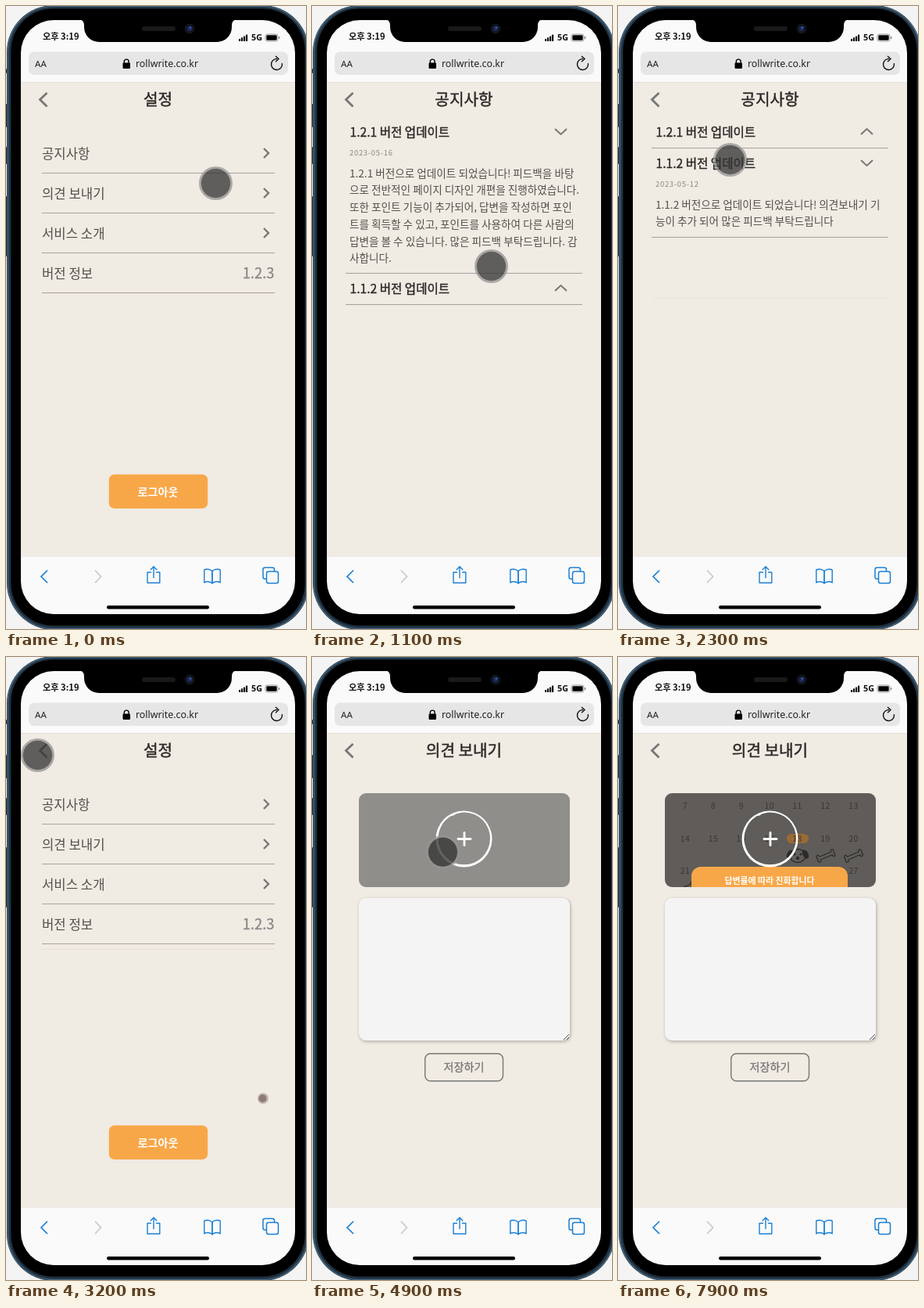
Recreate the animation shown at these times as an HTML page with a canvas. Size 384 px wide and 796 px high, loop 8 s.

```html
<!DOCTYPE html>
<html lang="ko">
<head>
<meta charset="utf-8">
<style>
html, body { margin: 0; width: 100%; height: 100%; overflow: hidden; background: #fff; }
canvas { display: block; width: 100vw; height: 100vh; }
</style>
</head>
<body>
<canvas id="stage" width="384" height="796"></canvas>
<script>
const ctx = document.getElementById('stage').getContext('2d');
const LOOP = 8000, STEP = 100;
const KR = '"Noto Sans CJK KR", "Noto Sans KR", "Noto Sans CJK", sans-serif';
const UI = '"Noto Sans", "Open Sans", sans-serif';
const INK = '#2b2928', SOFT = '#53504d', GREY = '#777', RULE = '#a5a39f';
const PAPER = '#f0ebe3', ORANGE = '#f8a748', BLUE = '#1a7fd4';

// time, x, y of the touch pointer
const TOUCH = [
  [0, 268.5, 226.5], [300, 150, 190], [600, 150, 190], [750, 165, 164], [900, 170, 168],
  [1100, 229.5, 332.5], [1300, 215, 361], [1800, 205, 361], [2300, 143.5, 196.5],
  [2600, 40.5, 125.5], [3300, 40.5, 125.5], [4100, 116, 239], [4300, 119.5, 241.5],
  [4600, 119.5, 241.5], [5100, 193.5, 253.5], [5300, 193.5, 253.5]
];

const clamp = v => Math.max(0, Math.min(1, v));
const ease = v => v * v * (3 - 2 * v);
const ramp = (t, from, to) => ease(clamp((t - from) / (to - from)));

function along(keys, t) {
  const i = keys.findIndex(k => k[0] > t);
  if (i < 1) return keys[keys.length - 1].slice(1);
  const [t0, x0, y0] = keys[i - 1], [t1, x1, y1] = keys[i];
  const p = ease((t - t0) / (t1 - t0));
  return [x0 + (x1 - x0) * p, y0 + (y1 - y0) * p];
}

function box(x, y, w, h, r, fill) {
  ctx.beginPath();
  ctx.roundRect(x, y, w, h, r);
  if (fill) { ctx.fillStyle = fill; ctx.fill(); }
}

function dot(x, y, r, fill) {
  ctx.beginPath();
  ctx.arc(x, y, r, 0, 7);
  ctx.fillStyle = fill;
  ctx.fill();
}

function stroke(color, width = 1, cap = 'butt') {
  ctx.strokeStyle = color;
  ctx.lineWidth = width;
  ctx.lineCap = cap;
  ctx.lineJoin = cap === 'round' ? 'round' : 'miter';
  ctx.stroke();
}

function poly(points, color, width, cap) {
  ctx.beginPath();
  points.forEach(([x, y]) => ctx.lineTo(x, y));
  stroke(color, width, cap);
}

const rule = (x0, x1, y, color = RULE) => poly([[x0, y + .5], [x1, y + .5]], color, 1);

// y is the optical middle of the glyphs; bolden thickens by a thin outline
function text(str, x, y, size, { color = INK, weight = 400, align = 'left', font = KR, gap = 0, bolden = 0 } = {}) {
  ctx.font = `${weight} ${size}px ${font}`;
  ctx.letterSpacing = gap + 'px';
  ctx.textAlign = align;
  ctx.fillStyle = ctx.strokeStyle = color;
  ctx.fillText(str, x, y + size * .37);
  if (bolden) {
    ctx.lineWidth = bolden;
    ctx.lineJoin = 'round';
    ctx.strokeText(str, x, y + size * .37);
  }
}

function phone() {
  ctx.fillStyle = '#f4f4f4';
  ctx.fillRect(0, 0, 384, 796);
  for (const [y, h] of [[80, 6], [125, 30], [180, 22], [243, 77]]) box(0, y, 4, h, 1, '#2a3a48');
  box(1, -1, 387, 798, 60, '#1d2c39');
  box(2.5, .5, 384, 795, 58);
  stroke('#456680', 1.6);
  box(4.5, 2, 380, 792, 56);
  stroke('#24394b', 1.6);
  box(6.5, 3.5, 376, 788, 54, '#000');
  box(19, 18, 351, 759, 42, '#fafafa');
  ctx.fillStyle = PAPER;
  ctx.fillRect(19, 97, 351, 606);
  rule(19, 370, 97, '#e5e1dc');
  rule(19, 370, 703, '#ececec');

  ctx.beginPath();
  ctx.moveTo(94, 17);
  ctx.quadraticCurveTo(100, 18, 100, 25);
  ctx.arcTo(100, 46, 118, 46, 19);
  ctx.arcTo(289, 46, 289, 28, 19);
  ctx.lineTo(289, 25);
  ctx.quadraticCurveTo(289, 18, 295, 17);
  ctx.fillStyle = '#000';
  ctx.fill();
  box(174, 26, 43, 6, 3, '#191919');
  dot(235, 29, 6.5, '#11151d');
  dot(235, 29, 3.2, '#1c2a5c');
  dot(236, 27.5, 1.3, '#3d5cab');
  box(129, 766, 131, 4.5, 2.2, '#000');
}

function statusBar() {
  text('오후 3:19', 47, 39, 11.2, { color: '#111', weight: 700 });
  text('5G', 314, 40.5, 10.8, { color: '#111', weight: 600, font: UI });
  for (let i = 0; i < 4; i++) box(298 + i * 3, 42 - i * 1.8, 2.2, 3 + i * 1.8, .5, '#111');
  box(332, 36, 16, 9, 2.5);
  stroke('#999', 1);
  box(333.3, 37.3, 13.4, 6.4, 1.4, '#000');
  box(349, 39, 1.5, 3, 1, '#888');

  box(29, 58.5, 332, 29.5, 7, '#e6e6e6');
  text('AA', 37, 73.5, 11.6, { color: '#222', font: UI });
  text('rollwrite.co.kr', 166, 73, 12.4, { color: '#222', font: UI });
  box(149.5, 72.5, 9.5, 7.5, 1.3, '#000');
  ctx.beginPath();
  ctx.arc(154.2, 71, 2.9, Math.PI, 0);
  ctx.lineTo(157.1, 73);
  ctx.moveTo(151.3, 71);
  ctx.lineTo(151.3, 73);
  stroke('#000', 1.4);
  ctx.beginPath();
  ctx.arc(346.5, 74.5, 7, -.2, -1.5, false);
  stroke('#111', 1.4);
  poly([[345, 64], [349, 67.6], [345, 71.3]], '#111', 1.4);
}

function toolbar() {
  poly([[53, 721], [45, 729], [53, 737]], BLUE, 1.7);
  poly([[114, 721], [121.5, 729], [114, 737]], '#c9c9cc', 1.7);
  poly([[185.5, 723.5], [181, 723.5], [181, 737], [196.8, 737], [196.8, 723.5], [192.5, 723.5]], BLUE, 1.4, 'round');
  poly([[189, 731], [189, 716.5]], BLUE, 1.4);
  poly([[184.8, 720.5], [189, 716.3], [193.2, 720.5]], BLUE, 1.4);
  for (const s of [-1, 1]) {
    ctx.beginPath();
    ctx.moveTo(264, 722);
    ctx.quadraticCurveTo(264 + s * 5, 718, 264 + s * 10.2, 720.5);
    ctx.lineTo(264 + s * 10.2, 736.5);
    ctx.quadraticCurveTo(264 + s * 5, 734, 264, 737.5);
    ctx.closePath();
    stroke(BLUE, 1.4);
  }
  box(329, 717.5, 14.5, 14.5, 2.5);
  stroke(BLUE, 1.5);
  box(333.5, 722.5, 15, 15, 2.5, '#fafafa');
  stroke(BLUE, 1.5);
}

function header(title) {
  poly([[52.5, 111], [43.5, 119.5], [52.5, 128.5]], GREY, 2.8);
  text(title, 194.5, 119.5, 20.2, { align: 'center', bolden: .45 });
}

function settings() {
  header('설정');
  ['공지사항', '의견 보내기', '서비스 소개', '버전 정보'].forEach((label, i) => {
    const y = 188 + i * 51;
    text(label, 46, y + .5, 16.7, { color: SOFT, weight: 300 });
    if (i < 3) poly([[330, y - 6], [336, y], [330, y + 6]], GREY, 2.4);
    rule(46, 344, y + 25);
  });
  text('1.2.3', 343.5, 341.5, 18.4, { color: '#888', align: 'right', bolden: .3 });
  box(131.8, 598.5, 126.4, 43.5, 7, ORANGE);
  text('로그아웃', 194.5, 620.5, 14.1, { color: '#fff', weight: 700, align: 'center' });
}

const NOTES = [
  { title: '1.2.1 버전 업데이트', date: '2023-05-16', height: 160, lines: [
    '1.2.1 버전으로 업데이트 되었습니다! 피드백을 바탕',
    '으로 전반적인 페이지 디자인 개편을 진행하였습니다.',
    '또한 포인트 기능이 추가되어, 답변을 작성하면 포인',
    '트를 획득할 수 있고, 포인트를 사용하여 다른 사람의',
    '답변을 볼 수 있습니다. 많은 피드백 부탁드립니다. 감',
    '사합니다.'] },
  { title: '1.1.2 버전 업데이트', date: '2023-05-12', height: 74, lines: [
    '1.1.2 버전으로 업데이트 되었습니다! 의견보내기 기',
    '능이 추가 되어 많은 피드백 부탁드립니다'] }
];

function notices(t) {
  header('공지사항');
  const open = [ramp(t, 700, 950) - ramp(t, 1500, 1750), ramp(t, 1500, 1750)];
  let top = 141;
  NOTES.forEach((note, i) => {
    const mid = top + 20, h = note.height * open[i], s = open[i] > .5 ? 1 : -1;
    text(note.title, 48.5, mid, 15.6, { bolden: .4 });
    poly([[311, mid - .5 - s * 3.5], [318.5, mid - .5 + s * 3.5], [326, mid - .5 - s * 3.5]], GREY, 2);
    ctx.save();
    ctx.beginPath();
    ctx.rect(43, top + 38, 304, h + 2);
    ctx.clip();
    text(note.date, 48, top + 47, 9.4, { color: '#888', weight: 300, gap: .75 });
    note.lines.forEach((line, n) =>
      text(line, 48, top + 72.7 + n * 21.7, 13.6, { color: SOFT, weight: 300 }));
    ctx.restore();
    top += 40 + h;
    rule(43, 346, top);
  });
}

function bone(x, y) {
  ctx.save();
  ctx.translate(x, y);
  ctx.rotate(-.4);
  ctx.beginPath();
  ctx.moveTo(-8, -2);
  ctx.lineTo(8, -2);
  ctx.bezierCurveTo(8, -7, 14, -4, 11, 0);
  ctx.bezierCurveTo(14, 4, 8, 7, 8, 2);
  ctx.lineTo(-8, 2);
  ctx.bezierCurveTo(-8, 7, -14, 4, -11, 0);
  ctx.bezierCurveTo(-14, -4, -8, -7, -8, -2);
  stroke('#2c2a28', 1.2);
  ctx.restore();
}

function calendar() {
  ctx.save();
  box(60, 174, 270, 120, 9, '#5f5c59');
  ctx.clip();
  box(216, 226, 28, 12, 6, '#9a6a34');
  for (let d = 7; d < 28; d++) {
    const col = d % 7, row = Math.floor(d / 7) - 1;
    text(String(d), 86 + col * 35.9, 190 + row * 41.7, 10.5, { color: '#383633', align: 'center', gap: .4 });
  }
  for (const x of [220, 240]) {
    ctx.beginPath();
    ctx.ellipse(x, 252, 3.5, 6, x < 230 ? .5 : -.5, 0, 7);
    ctx.fillStyle = '#2c2a28';
    ctx.fill();
  }
  ctx.beginPath();
  ctx.ellipse(230, 254, 10, 8.5, 0, 0, 7);
  stroke('#2c2a28', 1.3);
  for (const x of [226, 234]) dot(x, 252, 1.5, '#2c2a28');
  dot(230, 257, 2.2, '#2c2a28');
  bone(266, 254);
  bone(301.5, 254);
  bone(87, 295);
  box(94, 268, 200, 40, 12, ORANGE);
  text('답변률에 따라 진화합니다', 194, 286, 10.9, { color: '#fff', weight: 700, align: 'center' });
  ctx.restore();
}

function feedback(t) {
  header('의견 보내기');
  if (t < 7900) box(60, 174, 270, 120, 9, '#908e8a');
  else calendar();

  // brush ring: uneven band between two offset ellipses
  ctx.beginPath();
  ctx.ellipse(194.5, 232.5, 36, 36, 0, 0, 7);
  ctx.closePath();
  ctx.moveTo(228, 232);
  ctx.ellipse(194.7, 231.9, 33.3, 33.5, .4, 0, 7);
  ctx.fillStyle = '#fff';
  ctx.fill('evenodd');
  poly([[180, 202], [185, 199], [190, 198]], '#fff', 2, 'round');
  poly([[187, 232.5], [203, 232.5]], '#fff', 2.8, 'round');
  poly([[195, 224.5], [195, 240.5]], '#fff', 2.8, 'round');

  ctx.save();
  ctx.shadowColor = 'rgba(0,0,0,.28)';
  ctx.shadowBlur = 4;
  ctx.shadowOffsetX = 1;
  ctx.shadowOffsetY = 1.5;
  box(60, 308, 270, 182, 9, '#f4f4f4');
  ctx.restore();
  poly([[322, 489], [329, 482]], '#555', 1);
  poly([[326, 489], [329, 486]], '#555', 1);

  box(144.7, 506.7, 99.8, 35, 7);
  stroke(GREY, 1.4);
  text('저장하기', 194.5, 523.5, 14.1, { color: GREY, align: 'center', bolden: .3 });
}

function touch(t) {
  if (t >= 5300) return;
  const [x, y] = along(TOUCH, t);
  dot(x, y, 19, 'rgba(50,50,50,.76)');
  ctx.beginPath();
  ctx.arc(x, y, 20, 0, 7);
  stroke('rgba(150,148,146,.75)', 3);
}

function arrow(t) {
  if (t < 5500 || t >= 6100) return;
  const p = clamp((t - 5700) / 300);
  ctx.save();
  ctx.translate(194 + 118 * p, 252 + 32 * p);
  ctx.beginPath();
  [[0, 0], [0, 16], [4, 12.5], [6.5, 18.5], [9, 17.5], [6.5, 11.5], [11.5, 11.5]]
    .forEach(([x, y]) => ctx.lineTo(x, y));
  ctx.closePath();
  ctx.fillStyle = '#fff';
  ctx.fill();
  stroke('#000', 1);
  ctx.restore();
}

function draw(t) {
  phone();
  statusBar();
  toolbar();
  if (t >= 4500) feedback(t);
  else if (t >= 600 && t < 2900) notices(t);
  else settings();
  if (t >= 1800 && t < 4500) rule(45, 344, 373, '#e5e0d8');
  if (t >= 3100 && t < 3300) {
    dot(329, 564, 7, '#c4b8b2');
    dot(328.5, 564, 5, '#8f7b75');
  }
  touch(t);
  arrow(t);
}

function tick(now) {
  draw(Math.floor((now % LOOP) / STEP) * STEP);
  requestAnimationFrame(tick);
}
requestAnimationFrame(tick);
</script>
</body>
</html>
```
